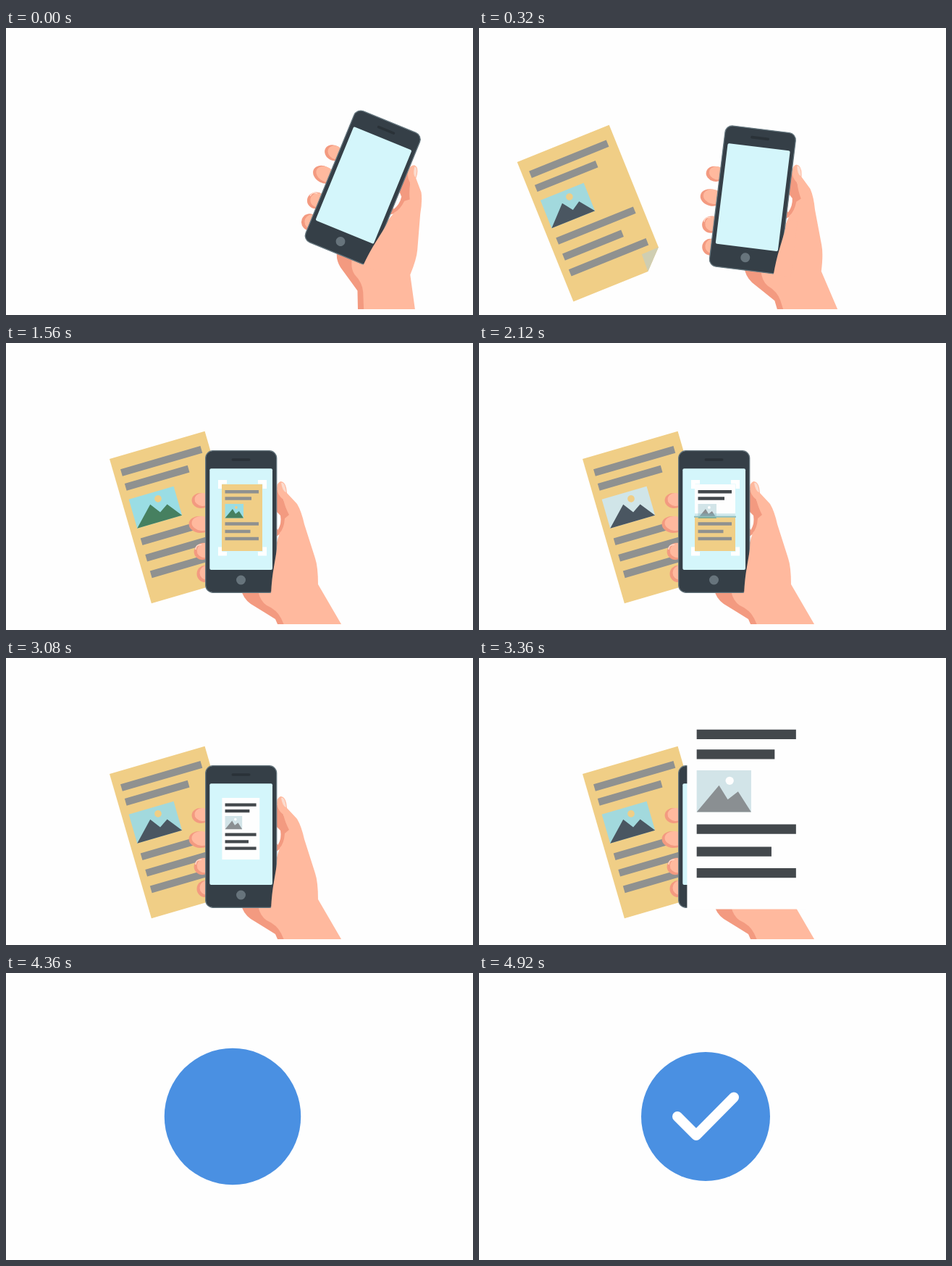
Write an HTML page with a canvas that moves like this. It is 645 px wide and 396 px high and loops after 4960 ms.

```html
<!DOCTYPE html>
<html lang="en">
<head>
<meta charset="utf-8">
<title>Document scan</title>
<style>
html, body { margin: 0; width: 100%; height: 100%; overflow: hidden; background: #fefefe; }
canvas { display: block; }
</style>
</head>
<body>
<canvas id="stage" width="645" height="396"></canvas>
<script>
const ctx = document.getElementById('stage').getContext('2d');
const LOOP = 4960;
const FLOOR = 388;
const SKIN = '#ffb99e', SHADE = '#f39a80';
const BUTTON = { x: 324.5, y: 327 };

const clamp = v => Math.min(1, Math.max(0, v));
const span = (t, from, to) => clamp((t - from) / (to - from));
const mix = (a, b, p) => a + (b - a) * p;
const easeInOut = u => u < .5 ? 4 * u ** 3 : 1 - 4 * (1 - u) ** 3;
const easeInBack = u => u * u * (2.7 * u - 1.7);
const easeOutBack = u => 1 + 1.77 * (1 - u) ** 2 - 2.77 * (1 - u) ** 3;

function fillPath(color, d) {
  ctx.fillStyle = color;
  ctx.fill(new Path2D(d));
}

function disc(color, x, y, rx, ry = rx, turn = 0) {
  ctx.fillStyle = color;
  ctx.beginPath();
  ctx.ellipse(x, y, rx, ry, turn, 0, Math.PI * 2);
  ctx.fill();
}

function box(color, x, y, w, h, r = 0) {
  ctx.fillStyle = color;
  ctx.beginPath();
  ctx.roundRect(x, y, w, h, r);
  ctx.fill();
}

function layer(alpha, draw) {
  if (alpha <= 0) return;
  ctx.save();
  ctx.globalAlpha *= alpha;
  draw();
  ctx.restore();
}

function picture(x, y, w, h, look) {
  box(look.sky, x, y, w, h);
  disc(look.sun, x + w * .605, y + h * .25, w * .075);
  ctx.fillStyle = look.hill;
  ctx.beginPath();
  for (const [px, py] of [[0, 1], [.41, .36], [.57, .7], [.76, .51], [1, 1]])
    ctx.lineTo(x + w * px, y + h * py);
  ctx.fill();
}

function rows(color, left, thick, list) {
  for (const [right, y] of list) box(color, left, y - thick / 2, right - left, thick);
}

function paper(look) {
  fillPath('#f0ce86', 'M0 0H137V182L111 207.5H0Z');
  fillPath('#cfceb2', 'M112 182.5L137 182L111 207.5Z');
  rows('#8f9190', 10.5, 10, [[125.5, 22.8], [101, 43.5], [125.5, 122], [98, 145.5], [125.5, 169]]);
  picture(10, 61, 64.5, 41.5, look);
}

function miniDoc(sheet, ink, look) {
  box(sheet, 298, 195, 56, 92);
  rows(ink, 302.5, 4.5, [[349, 205.2], [339, 214.5], [349, 249.5], [337.5, 260], [349, 270]]);
  picture(302.5, 222, 25.5, 19.5, look);
}

const COLOR_LOOK = { sky: '#9adde4', hill: '#468060', sun: '#f0ce86' };
const GREY_LOOK = { sky: '#d2e4e8', hill: '#8a8f92', sun: '#fefefe' };

function paperLook(t) {
  if (t >= 600 && t < 2000) return COLOR_LOOK;
  const sky = t >= 2000 && t < 2640 ? '#d0e5e8' : '#a2d9dd';
  return { sky, hill: '#4a5661', sun: '#f0ce86' };
}

function drawPaper(t, p) {
  ctx.save();
  ctx.translate(mix(37, 143, p), mix(189.4, 160, p));
  ctx.rotate(-mix(23, 16.2, p) * Math.PI / 180);
  paper(paperLook(t));
  ctx.restore();
}

function finger(x, y, rx, ry, turn) {
  disc(SHADE, x, y, rx, ry, turn);
  disc(SKIN, x + 2.5, y - 1.5, rx - 1.5, ry - 1.5, turn);
}

function drawHand(p) {
  ctx.save();
  ctx.beginPath();
  ctx.rect(0, 0, 645, FLOOR);
  ctx.clip();
  ctx.translate(mix(462, BUTTON.x, p), mix(294.5, BUTTON.y, p));
  ctx.rotate(mix(22.3, 0, p) * Math.PI / 180);
  ctx.translate(-BUTTON.x, -BUTTON.y);

  fillPath(SHADE, 'M325 340Q327 352 338 360Q356 371 372 381L382 404L410 460H440L400 340Z');
  fillPath(SHADE, 'M372 200L380 208L392 238L386 243L383 260L372 268Z');
  fillPath('#fefefe', 'M374 233L379 238Q381 249 375.5 258L374 256Z');
  fillPath(SKIN, 'M348 342Q351 356 360 362Q374 368 380 380L390 402L420 460H505L431 333' +
    'Q431 309 427 297L412 250Q408 232 402 222L388 207Q387 191 379 191Q374 193 374 201' +
    'Q375 210 383 216Q386 228 391 237L385 242Q384 256 378 262L372 282V342Z');
  fillPath('#fbdccf', 'M380 193Q385 191 387 206Q382 205 380 193Z');

  finger(269, 217.5, 12.5, 10.5, .1);
  finger(268, 250.5, 15.5, 11.5, .1);
  finger(272, 287.5, 12.5, 11.5, -.4);
  finger(275, 318.5, 11.5, 11.5, 0);
  ctx.strokeStyle = '#ffd9c9';
  ctx.lineWidth = 1.5;
  ctx.stroke(new Path2D('M262 285Q262 278 270 278'));

  box('#353f47', 275.7, 148.7, 98, 195.6, 10);
  ctx.strokeStyle = '#65767e';
  ctx.lineWidth = 1.3;
  ctx.stroke();
  box('#2a3238', 311.5, 159.2, 26, 3.6, 1.8);
  box('#d4f6fb', 281.3, 173.3, 86.7, 139.7, 2);
  disc('#67747c', BUTTON.x, BUTTON.y, 6.5);
  fillPath(SKIN, 'M376 268Q374 288 370 309Q367 325 366 346H390V268Z');
  ctx.restore();
}

function drawBrackets() {
  ctx.strokeStyle = '#fff';
  ctx.lineWidth = 5.5;
  for (const [x, y, sx, sy] of [[293, 189, 1, 1], [360, 189, -1, 1], [293, 293.5, 1, -1], [360, 293.5, -1, -1]]) {
    ctx.beginPath();
    ctx.moveTo(x + 12 * sx, y + 2.75 * sy);
    ctx.lineTo(x + 2.75 * sx, y + 2.75 * sy);
    ctx.lineTo(x + 2.75 * sx, y + 12 * sy);
    ctx.stroke();
  }
}

function drawScan(t) {
  const scan = span(t, 1640, 2640);
  const lineY = mix(195, 287, scan);
  const u = span(t, 3020, 3360);
  const grow = easeInBack(u);
  const later = span(t, 3360, 3640);
  const size = 1 + 1.95 * grow + .3 * later;

  layer(span(t, 800, 1000) * (1 - span(t, 2760, 2960)), drawBrackets);
  ctx.translate(326 + 44 * grow, 241 - 30 * u);
  ctx.scale(size, size);
  ctx.translate(-326, -241);
  if (scan < 1) miniDoc('#f0ce86', '#8f9190', COLOR_LOOK);
  if (scan > 0) {
    ctx.save();
    ctx.beginPath();
    ctx.rect(290, 190, 72, lineY - 190);
    ctx.clip();
    miniDoc('#fefefe', '#43484c', GREY_LOOK);
    ctx.restore();
  }
  if (scan > 0 && scan < 1) {
    box('rgba(120,190,200,.35)', 298, Math.max(195, lineY - 4), 56, Math.min(4, lineY - 195));
    box('#8fbfbf', 297, lineY - .5, 58, 2);
  }
}

function drawScene(t) {
  const back = .38 * span(t, 3360, 3640);
  const handP = easeInOut(span(t, 0, 560)) - back;
  const paperP = easeInOut(span(t, 200, 560)) * (1 - back / .38);
  layer(1 - span(t, 3360, 3640), () => {
    layer(span(t, 80, 240), () => drawPaper(t, paperP));
    drawHand(handP);
    layer(span(t, 560, 720), () => drawScan(t));
  });
}

function drawBadge(t) {
  if (t < 3850) return;
  disc('#4a90e2', 313, 198, 89 * easeOutBack(span(t, 3850, 4510)));
  const draw = 1 - (1 - span(t, 4360, 4900)) ** 2;
  if (!draw) return;
  const short = Math.hypot(26, 26), long = Math.hypot(52, 52.5);
  const reach = draw * (short + long);
  const a = Math.min(1, reach / short), b = Math.max(0, (reach - short) / long);
  ctx.strokeStyle = '#fff';
  ctx.lineWidth = 14;
  ctx.lineCap = ctx.lineJoin = 'round';
  ctx.beginPath();
  ctx.moveTo(274, 198);
  ctx.lineTo(274 + 26 * a, 198 + 26 * a);
  if (b) ctx.lineTo(300 + 52 * b, 224 - 52.5 * b);
  ctx.stroke();
}

function render(t) {
  ctx.save();
  box('#fefefe', 0, 0, 645, 396);
  if (t < 3640) drawScene(t);
  else drawBadge(t);
  ctx.restore();
}

let start;
function tick(now) {
  start ??= now;
  render((now - start) % LOOP);
  requestAnimationFrame(tick);
}
render(0);
requestAnimationFrame(tick);
</script>
</body>
</html>
```
